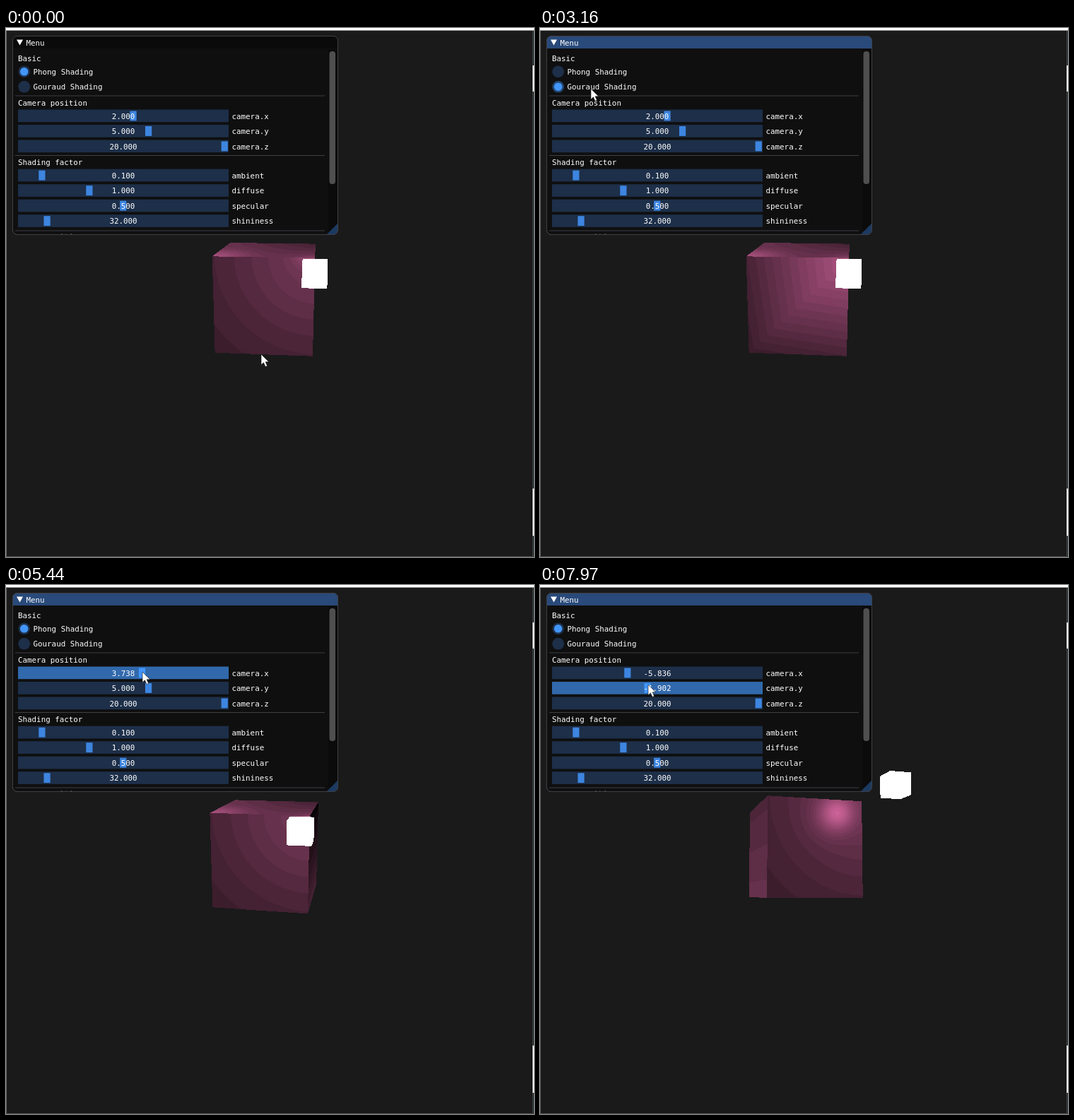
An HTML page with a canvas that plays this animation: 747 by 749 pixels, repeating every 8 s.

```html
<!DOCTYPE html>
<html lang="en">
<head>
<meta charset="utf-8">
<title>Shading menu</title>
<style>
html, body { margin: 0; width: 100%; height: 100%; overflow: hidden; background: #1a1a1a; }
canvas, svg { position: absolute; left: 0; top: 0; width: 747px; height: 749px; }
text { font: 10.85px "DejaVu Sans Mono", monospace; fill: #fff; }
.val { text-anchor: middle; }
</style>
</head>
<body>
<canvas id="scene" width="747" height="749"></canvas>
<svg id="ui" viewBox="0 0 747 749"></svg>
<script>
const LOOP = 8000;
const CX = 371, CY = 378, FOCAL = 670;
const LIGHT = [2, 2, 5];
const BASE = [102, 49, 76];
const TONES = 12;
const AREA = { x: 280, y: 250, w: 265, h: 225 };
const FRAME = '#1d2f49', HOVER = '#24456d', ACTIVE = '#3169ac';
const GRAB = '#3d85e0', BRIGHT = '#4296fa', LINE = '#3f3f46';

const clamp = v => Math.max(0, Math.min(1, v));
const mix = (a, b, k) => a + (b - a) * k;

// Slider track: value to pixel for any range, and back for the camera range.
const grabX = (v, min = -20, max = 20) => 22.2 + 287 * (v - min) / (max - min);
const valueAt = x => (x - 22.2) / 287 * 40 - 20;

// Pointer gestures: start, end, x, y. It rests in between.
const gestures = [
  [460, 920, 48, 93], [920, 1160, 54, 82],
  [1410, 1590, 64, 80], [1860, 2040, 71, 62], [2400, 2850, 71, 86],
  [3410, 3480, 76, 66], [3880, 4250, grabX(2.1), 123],
  [4660, 4910, grabX(-2.04), 123], [5010, 5270, grabX(3.5), 123],
  [5400, 5440, grabX(3.738), 123], [5470, 5530, grabX(4.5), 122],
  [5640, 6400, grabX(-5.094), 115], [6540, 6750, grabX(-5.836), 115],
  [7340, 7580, grabX(-1.35), 142], [7930, 7970, grabX(-1.902), 141]
];

function pointer(t) {
  let px = 360, py = 462;
  for (const [from, to, x, y] of gestures) {
    const k = 1 - (1 - clamp((t - from) / (to - from))) ** 1.45;
    px = mix(px, x, k);
    py = mix(py, y, k);
  }
  return [px, py];
}

const dot = (a, b) => a[0] * b[0] + a[1] * b[1] + a[2] * b[2];
const sub = (a, b) => [a[0] - b[0], a[1] - b[1], a[2] - b[2]];
const unit = a => { const l = Math.hypot(...a); return a.map(v => v / l); };
const cross = (a, b) => [
  a[1] * b[2] - a[2] * b[1], a[2] * b[0] - a[0] * b[2], a[0] * b[1] - a[1] * b[0]
];

// Entry point of a ray into an axis-aligned cube, or null.
function hit(eye, dir, mid, half) {
  let near = -1e9, far = 1e9, axis = 0;
  for (let i = 0; i < 3; i++) {
    const p = (mid[i] - half - eye[i]) / dir[i];
    const q = (mid[i] + half - eye[i]) / dir[i];
    const lo = Math.min(p, q);
    if (lo > near) { near = lo; axis = i; }
    far = Math.min(far, Math.max(p, q));
  }
  return near < far ? { t: near, axis } : null;
}

function specular(p, eye) {
  const l = unit(sub(LIGHT, p)), v = unit(sub(eye, p));
  return 0.95 * Math.max(0, dot([-l[0], -l[1], l[2]], v)) ** 32;
}

function phong(p, eye) {
  return 0.1 + unit(sub(LIGHT, p))[2] + specular(p, eye);
}

function makeShader(eye, gouraud) {
  const corner = (x, y) => phong([x, y, 2], eye);
  const tl = corner(-2, 2), tr = corner(2, 2), bl = corner(-2, -2), br = corner(2, -2);
  const side = clamp((eye[0] + 1.5) / 3);
  return (p, axis) => {
    const u = (p[0] + 2) / 4, v = (p[1] + 2) / 4, w = (2 - p[2]) / 4;
    if (axis === 2) {
      if (!gouraud) return phong(p, eye);
      return v > u ? tl + u * (tr - tl) + (1 - v) * (bl - tl)
                   : br + v * (tr - br) + (1 - u) * (bl - br);
    }
    if (axis === 1) {
      return 1 - 0.35 * side * u * w
        + 0.6 * side * Math.exp(-10 * u * u - 6 * w * w)
        + 0.6 * specular([p[0], 2, 2], eye) * Math.exp(-6 * w);
    }
    return p[0] < 0 ? 1 - 0.24 * v : 0.08 + 0.6 * (1 - v);
  };
}

const ctx = document.getElementById('scene').getContext('2d');
const image = ctx.createImageData(AREA.w, AREA.h);

function drawScene(eye, gouraud) {
  const fwd = unit(eye.map(v => -v));
  const right = unit(cross(fwd, [0, 1, 0])), up = cross(right, fwd);
  const shade = makeShader(eye, gouraud);
  let n = 0;
  for (let j = 0; j < AREA.h; j++) {
    const b = (CY - AREA.y - j - 0.5) / FOCAL;
    for (let i = 0; i < AREA.w; i++) {
      const a = (AREA.x + i + 0.5 - CX) / FOCAL;
      const dir = fwd.map((f, k) => f + right[k] * a + up[k] * b);
      let rgb = [26, 26, 26], h;
      if (hit(eye, dir, LIGHT, 0.4)) rgb = [255, 255, 255];
      else if ((h = hit(eye, dir, [0, 0, 0], 2))) {
        const lum = shade(eye.map((e, k) => e + dir[k] * h.t), h.axis);
        rgb = BASE.map(c => c * Math.round(lum * TONES) / TONES);
      }
      for (const c of rgb) image.data[n++] = c;
      image.data[n++] = 255;
    }
  }
  ctx.putImageData(image, AREA.x, AREA.y);
}

const rect = (x, y, w, h, fill, more = '') =>
  `<rect x="${x}" y="${y}" width="${w}" height="${h}" fill="${fill}" ${more}/>`;
const label = (x, y, s, more = '') => `<text x="${x}" y="${y}" ${more}>${s}</text>`;
const rule = y => rect(13, y, 438, 1, LINE);
const radio = (id, y, name) =>
  `<circle id="${id}-bg" cx="25.7" cy="${y}" r="8.4" fill="${FRAME}"/>` +
  `<circle id="${id}-dot" cx="25.7" cy="${y}" r="5.8" fill="${BRIGHT}"/>` +
  label(38.5, y + 4, name);
const sliders = (top, rows) => rows.map(([name, value, min, max], i) => {
  const y = top + 21.5 * i;
  return rect(17, y - 9, 298, 17.7, FRAME, `id="${name}-bg"`) +
    rect(grabX(value, min, max) - 4.6, y - 7, 9.2, 13.9, GRAB, `id="${name}-grab"`) +
    label(166, y + 4, value.toFixed(3), `class="val" id="${name}-val"`) +
    label(319.5, y + 4, name);
}).join('');

const windowEdge = rect(0, 0, 747, 3.5, '#fff') + rect(0, 4, 1, 745, '#666') +
  rect(0, 748, 747, 1, '#555') + rect(745, 4, 1, 745, '#4a4a4a') +
  rect(746, 4, 1, 745, '#1d3038') +
  rect(745, 53, 2, 37, '#eee') + rect(745, 652, 2, 67, '#eee');

const panel = fill => rect(9.5, 11.5, 460, 281, fill, `rx="6.5" stroke="${LINE}"`);

document.getElementById('ui').innerHTML =
  '<clipPath id="fold"><rect x="58" y="280" width="60" height="11.6"/></clipPath>' +
  windowEdge + panel('#0f0f0f') +
  '<path id="title" d="M9.5 29V18Q9.5 11.5 16 11.5H463Q469.5 11.5 469.5 18V29Z"/>' +
  rect(456, 30, 12.5, 257, '#0b0b0b') +
  rect(457.5, 33, 8.5, 188, '#4f4f4f', 'rx="4"') +
  '<path d="M469 277V287Q469 292 464 292H454Z" fill="#1c3a60"/>' +
  '<path d="M15 16.5H24L19.5 24.5Z" fill="#fff"/>' +
  label(28.5, 24.5, 'Menu') + label(17, 47, 'Basic') +
  radio('phong', 61.8, 'Phong Shading') + radio('gouraud', 83.2, 'Gouraud Shading') +
  rule(95.5) + label(17, 109.5, 'Camera position') +
  sliders(124.5, [['camera.x', 2, -20, 20], ['camera.y', 5, -20, 20], ['camera.z', 20, -20, 20]]) +
  rule(180) + label(17, 194, 'Shading factor') +
  sliders(208.7, [['ambient', 0.1, 0, 1], ['diffuse', 1, 0, 3], ['specular', 0.5, 0, 1], ['shininess', 32, 0, 256]]) +
  rule(286.5) + `<g clip-path="url(#fold)">${label(56, 299, 'position')}</g>` +
  panel('none') +
  '<path id="cursor" d="M0 0V15L3.4 11.8L6 17.5L8.6 16.4L6.2 10.8H10.8Z" fill="#fff" stroke="#111" stroke-width=".6"/>';

const el = id => document.getElementById(id);
const paint = (id, fill) => el(id).setAttribute('fill', fill);

function setSlider(id, value, active, over) {
  paint(id + '-bg', active ? ACTIVE : over ? HOVER : FRAME);
  paint(id + '-grab', active ? BRIGHT : GRAB);
  el(id + '-grab').setAttribute('x', grabX(value) - 4.6);
  el(id + '-val').textContent = value.toFixed(3);
}

let last = '';

function render(t) {
  const [mx, my] = pointer(t);
  // Each camera slider follows the pointer while it is held.
  const x = t < 4460 ? 2 : valueAt(pointer(Math.min(t, 7000))[0]);
  const y = t < 7790 ? 5 : valueAt(mx);
  const gouraud = (t >= 1590 && t < 2440) || (t >= 3160 && t < 3880);
  const focus = t >= 1410;
  const over = (top, bottom, edge) => focus && mx > 17 && mx < edge && my >= top && my < bottom;

  paint('title', focus ? '#294a7a' : '#0a0a0a');
  paint('phong-bg', over(53, 70, 124) ? HOVER : FRAME);
  paint('gouraud-bg', over(74, 92, 137) ? HOVER : FRAME);
  el('phong-dot').style.display = gouraud ? 'none' : '';
  el('gouraud-dot').style.display = gouraud ? '' : 'none';
  setSlider('camera.x', x, t >= 4460 && t < 7380, over(115, 133, 315));
  setSlider('camera.y', y, t >= 7790, over(137, 155, 315));
  el('cursor').setAttribute('transform', `translate(${Math.round(mx + 0.5)} ${Math.round(my)})`);

  const key = [x, y, gouraud].join();
  if (key !== last) drawScene([x, y, 20], gouraud);
  last = key;
}

const start = performance.now();
function tick() {
  const t = (performance.now() - start) % LOOP;
  render(Math.floor(t / 10) * 10);
  requestAnimationFrame(tick);
}
ctx.fillStyle = '#1a1a1a';
ctx.fillRect(0, 0, 747, 749);
tick();
</script>
</body>
</html>
```
